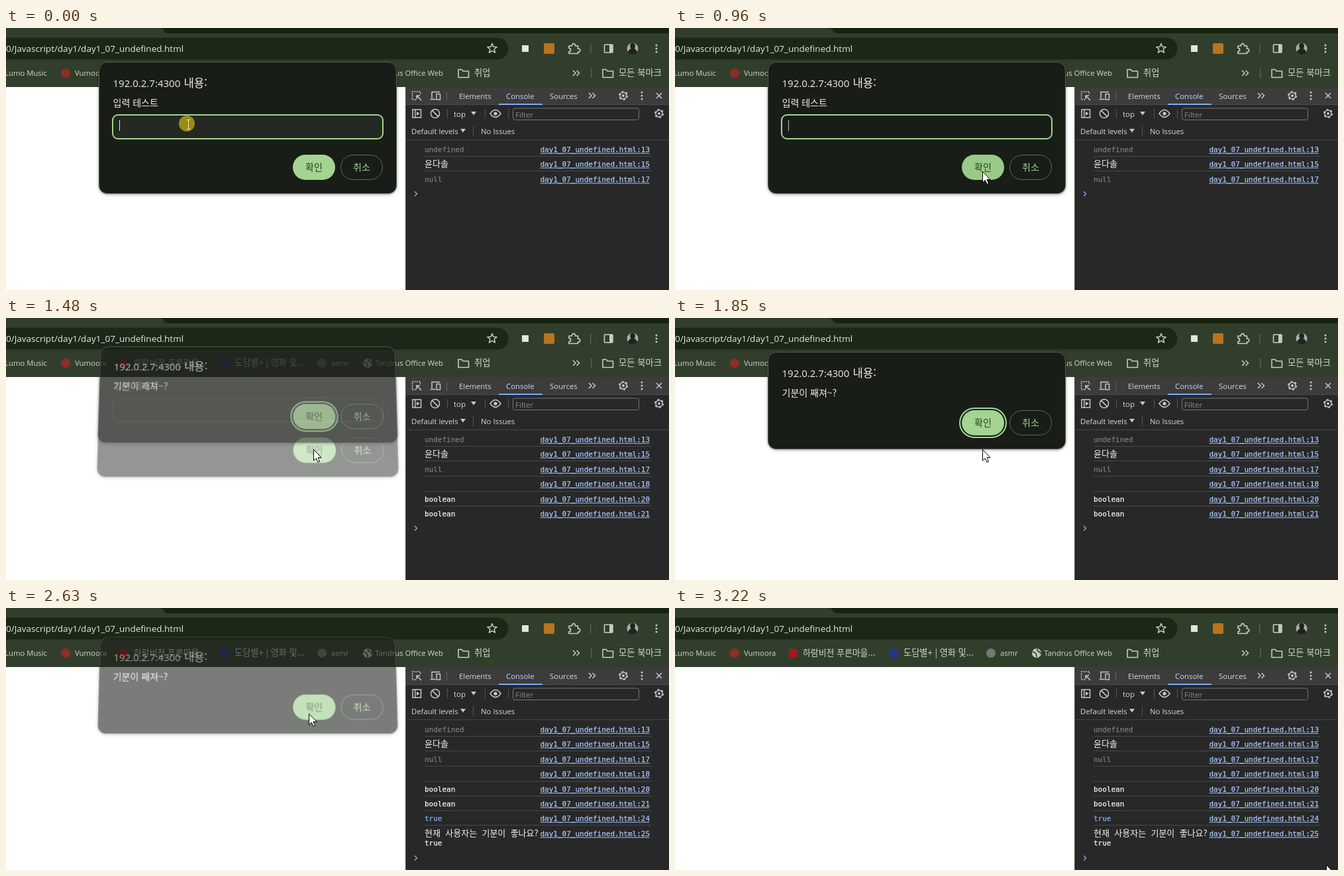
Recreate the animation shown at these times as an HTML page. Size 1001 px wide and 395 px high, loop 3.27 s.

```html
<!DOCTYPE html>
<html lang="ko">
<head>
<meta charset="utf-8">
<style>
html, body { margin: 0; width: 100%; height: 100%; overflow: hidden; background: #fff; }
svg { position: absolute; left: 0; top: 0; overflow: hidden; }
text { white-space: pre; }
.ui { font-family: "Open Sans", "Noto Sans", sans-serif; }
.ko { font-family: "Noto Sans CJK KR", "Noto Sans KR", "Noto Sans CJK", "Noto Sans CJK JP", sans-serif; }
.mono { font-family: "DejaVu Sans Mono", "Noto Sans Mono", monospace; }
.frame { filter: drop-shadow(0 1px 2px rgba(0, 0, 0, .4)); }
</style>
</head>
<body>
<script>
const LOOP = 3270;
const W = 1001, H = 395;
const ICON = '#c6cdc0', LABEL = '#d2d9cb', TOOL = '#c7cac8', TAB = '#d6d9d7';
const GREEN = '#a3d491', HOVER = '#99cb88', PANEL = '#191d17', TITLE = '#ecefe9';

const layer = (id, inner) => `<svg id="${id}" width="${W}" height="${H}" viewBox="0 0 ${W} ${H}">${inner}</svg>`;
const rect = (x, y, w, h, fill, more = '') => `<rect x="${x}" y="${y}" width="${w}" height="${h}" fill="${fill}" ${more}/>`;
const dot = (x, y, r, fill, more = '') => `<circle cx="${x}" cy="${y}" r="${r}" fill="${fill}" ${more}/>`;
const line = (d, color, width = 1.5, more = '') => `<path d="${d}" fill="none" stroke="${color}" stroke-width="${width}" ${more}/>`;
const shape = (d, fill) => `<path d="${d}" fill="${fill}"/>`;
const text = (s, x, y, size, fill, font = 'ui', more = '') =>
  `<text class="${font}" x="${x}" y="${y}" font-size="${size}" fill="${fill}" ${more}>${s}</text>`;

const dots = (x, y, color) => [-5, 0, 5].map(d => dot(x, y + d, 1.5, color)).join('');
const folder = x => line(`M${x} 62.5h5l2 2.5h8.5v9.5h-15.5z`, ICON, 1.6, 'stroke-linejoin="round"');
const chevrons = (x, y, color) => line(`M${x} ${y - 4}l4 4l-4 4M${x + 5.5} ${y - 4}l4 4l-4 4`, color);
const triangle = (x, y) => shape(`M${x} ${y}h8l-4 5.5z`, TOOL);
const gear = (x, y) => dot(x, y, 5, 'none', `stroke="${TOOL}" stroke-width="1.4"`) +
  dot(x, y, 6.3, 'none', `stroke="${TOOL}" stroke-width="1.6" stroke-dasharray="3 3.6"`) + dot(x, y, 1.9, TOOL);

function star(x, y) {
  const points = Array.from({ length: 10 }, (_, i) => {
    const r = i % 2 ? 3.3 : 7.6, a = i * Math.PI / 5;
    return `${(x + r * Math.sin(a)).toFixed(1)},${(y - r * Math.cos(a)).toFixed(1)}`;
  });
  return `<polygon points="${points.join(' ')}" fill="none" stroke="${ICON}" stroke-width="1.5" stroke-linejoin="round"/>`;
}

function browser() {
  return rect(0, 0, W, 89, '#17220f') +
    shape(`M0 0H230Q237 0 238 3.5Q239 8 246 8H${W}V89H0z`, '#323e2c') +
    shape('M0 14.5H742a16.5 16.5 0 0 1 0 33H0z', '#1c2817') +
    text('0/Javascript/day1/day1_07_undefined.html', 0, 36, 13.5, '#e3e9de') +
    star(734, 31) +
    rect(779, 26, 10, 10, '#dcebd6') +
    rect(812, 23, 16, 16, '#b8741f', 'rx="2"') +
    line('M850 27h4.5a2.6 2.6 0 1 1 5 0h4v4.2a2.6 2.6 0 1 1 0 5v2.3h-13.5v-3a2.6 2.6 0 0 0 0-5.2z', ICON, 1.7, 'stroke-linejoin="round"') +
    rect(882, 24, 1.5, 14, '#56634e') +
    rect(903.5, 25, 12.5, 12, 'none', `stroke="${ICON}" stroke-width="1.6" rx="1"`) + rect(911, 25, 5, 12, ICON) +
    dot(946, 31, 8.5, '#a9ada3') +
    shape('M939 37Q940 32 943.5 31.5Q940 23 946 22.5Q952 23 949 31.5Q952 32 953 37Q946 43 939 37z', '#20231f') +
    dots(982, 31, ICON) +
    text('Lumo Music', 62, 72, 11.3, LABEL, 'ui', 'text-anchor="end"') +
    dot(90, 68, 7, '#8d2f23') + text('Vumoora', 104, 72, 11.3, LABEL) +
    rect(172, 62, 12, 12, '#ad171b') + text('하람비전 푸른마을...', 193, 72.3, 12.9, LABEL, 'ko') +
    dot(330, 68, 7, '#24358f') + text('도담별+ | 영화 및...', 345, 72.3, 13.2, LABEL, 'ko') +
    dot(477, 68, 7, '#72787a') + text('asmr', 491, 72, 11.2, LABEL) +
    dot(546, 68, 7, ICON) + line('M540 66q4 1 5 3t1 5M547 61.5q-1 3 2 4t3 4', '#4a5545', 2) +
    text('Tandrus Office Web', 660, 72, 11.3, LABEL, 'ui', 'text-anchor="end"') +
    folder(683) + text('취업', 707, 72.3, 13.2, LABEL, 'ko') +
    chevrons(856, 68, ICON) + rect(883, 61, 1.5, 14, '#56634e') +
    folder(901) + text('모든 북마크', 925, 72.3, 13.3, LABEL, 'ko');
}

// Console messages: value, colour, source line, baseline, divider above, appearance stage, font
const GREY = '#7d7d7d', LIGHT = '#f1f3f4', LINK = '#a8c7fa';
const rows = [
  ['undefined', GREY, 13, 187, 0, 0], ['윤다솔', LIGHT, 15, 209, 193, 0, 'ko'], ['null', GREY, 17, 232, 215, 0],
  ['', LIGHT, 18, 254, 238, 1], ['boolean', LIGHT, 20, 277, 261, 1], ['boolean', LIGHT, 21, 299, 283, 1],
  ['true', '#7cacf8', 24, 321, 305, 2], ['현재 사용자는 기분이 좋나요?', LIGHT, 25, 344, 327, 2, 'ko'],
];
const promptY = [250, 317, 377];

// A hairline outline gives the small monospace text its heavier look
const code = (s, x, y, color) => text(s, x, y, 11, color, 'mono', `stroke="${color}" stroke-width=".25"`);

function message([value, color, number, y, divider, , font]) {
  return (divider ? rect(632, divider, 343, 1, '#474747') : '') +
    (font ? text(value, 632, y, 13, color, font, 'word-spacing="3.7"') : code(value, 632, y, color)) +
    (number === 25 ? code('true', 632, y + 14, color) : '') +
    code(`day1_07_undefined.html:${number}`, 806.5, y, LINK) +
    rect(806.5, y + 1.5, 165, 1, LINK);
}

function devtools() {
  const groups = [0, 1, 2].map(n => `<g id="rows${n}">${rows.filter(r => r[5] === n).map(message).join('')}</g>`);
  return rect(603, 89, 398, 306, '#282828') + rect(603, 89, 398, 26, '#3c3c3c') +
    rect(603, 89, 1, 306, '#4c4f4c') + rect(604, 115, 397, 1, '#4b4b4b') + rect(604, 168, 397, 1, '#474747') +
    line('M619 108h-5.5v-12h12v5', TOOL, 1.4, 'stroke-dasharray="2 1.4"') +
    line('M627 109l-6.5-6.5M620 107v-5h5', TOOL) +
    line('M643 106v-9.5h12M640.5 107.5h8', TOOL) + rect(650, 99.5, 5.5, 8.5, 'none', `stroke="${TOOL}" stroke-width="1.4"`) +
    rect(665, 96, 1, 14, '#606060') +
    text('Elements', 684, 107, 11.3, TAB) + text('Console', 755, 107, 11.4, '#c4d9fc') + text('Sources', 821, 107, 11.4, TAB) +
    rect(744, 114, 66, 2, '#7cacf8') +
    chevrons(880, 102, TOOL) + gear(932, 102) + dots(960, 102, TOOL) + line('M982 98l8 8m0-8l-8 8', TOOL) +
    rect(614, 123, 12.5, 12, 'none', `stroke="${TOOL}" stroke-width="1.5"`) + line('M617.8 123v12', TOOL, 1.4) +
    shape('M620 126l4.5 3l-4.5 3z', TOOL) +
    dot(648, 129, 6.6, 'none', `stroke="${TOOL}" stroke-width="1.5"`) + line('M643.4 124.4l9.2 9.2', TOOL) +
    rect(666, 122, 1, 14, '#555') + text('top', 676, 133.5, 11.5, TAB) + triangle(702, 126) +
    rect(723, 122, 1, 14, '#555') +
    line('M731 129q8-11 16 0q-8 11-16 0z', TOOL) + dot(739, 129, 2.6, TOOL) +
    rect(758, 122, 1, 14, '#555') +
    rect(765.5, 121, 190, 17.5, '#282828', 'rx="3" stroke="#747775"') + text('Filter', 769, 134.5, 11.6, '#868a88') +
    gear(986, 129) +
    text('Default levels', 612, 160, 11.3, TAB) + triangle(686, 152) +
    rect(705, 148, 1, 15, '#555') + text('No Issues', 717, 160, 11.4, TAB) +
    groups.join('') + line('M0-3.5l3.5 3.5l-3.5 3.5', '#7cacf8', 1.4, 'id="chevron"');
}

// Shared window: frame, title, body text and both buttons
const dialog = (height, body, buttonY, extra) =>
  rect(140.5, 51.5, 449, height, PANEL, 'rx="12" stroke="#596054" class="frame"') +
  text('192.0.2.7:4300', 161.5, 88.5, 15, TITLE) + text('내용:', 268.5, 88.5, 16.7, TITLE, 'ko') +
  text(body, 161.5, 117.5, 14, TITLE, 'ko') + extra +
  rect(433, buttonY, 64, 38, GREEN, 'rx="19" class="ok"') +
  text('확인', 452, buttonY + 24, 14, '#24421c', 'ko') +
  rect(505.5, buttonY + .5, 63, 37, 'transparent', 'rx="18.5" stroke="#5d6a56" class="cancel"') +
  text('취소', 524, buttonY + 24, 14, GREEN, 'ko');

document.body.innerHTML =
  layer('page', browser() + devtools()) +
  layer('prompt', dialog(198, '입력 테스트', 191,
    rect(161, 131, 408, 36, PANEL, 'rx="8" id="field"') + rect(171, 139, 1, 16, TITLE, 'id="caret"'))) +
  layer('confirm', dialog(146, '기분이 째져~?', 139,
    rect(430, 136, 70, 44, 'none', `rx="22" stroke="${GREEN}" stroke-width="2" id="ring"`))) +
  layer('pointer',
    dot(273, 144, 12, '#968d17', 'id="click"') +
    `<g id="beam">${line('M0-6.5h2.5h2.5M2.5-6.5v14M0 7.5h5', '#e6e4c8', 1)}</g>` +
    '<path id="arrow" d="M0 0V16.5L3.8 13L6.4 19L9 18L6.5 12H11.6z" fill="#fff" stroke="#000"/>');

const $ = id => document.getElementById(id);
const clamp = v => Math.max(0, Math.min(1, v));
const show = (id, on) => { $(id).style.opacity = +on; };
const ramp = (t, from, length) => clamp((t - from) / length);

// Pointer stops: time, x, y
const path = [
  [0, 273, 144], [30, 273, 144], [450, 464, 216], [1290, 464, 216], [1440, 464, 198], [1850, 464, 198],
  [2080, 520, 166], [2370, 457, 159], [2900, 457, 159], [3220, 983, 387], [LOOP, 983, 387],
];

function pointerAt(t) {
  const i = path.findIndex(p => p[0] > t);
  const [t0, x0, y0] = path[i - 1], [t1, x1, y1] = path[i];
  const k = (t - t0) / (t1 - t0), e = k * k * (3 - 2 * k);
  return [x0 + (x1 - x0) * e, y0 + (y1 - y0) * e];
}

// Window fades while rising and leaning back; away: 0 = in place, 1 = gone
function pose(id, away, centerY) {
  const style = $(id).style;
  style.opacity = 1 - away;
  style.visibility = away < 1 ? 'visible' : 'hidden';
  style.transformOrigin = `365px ${centerY}px`;
  style.transform = away > 0 && away < 1
    ? `translateY(${-20 * away}px) perspective(1000px) rotateX(${8 * Math.min(1, 2 * away)}deg)` : 'none';
}

function hover(id, buttonY, x, y) {
  const over = left => x >= left && x <= left + 64 && y >= buttonY && y <= buttonY + 38;
  document.querySelector(`#${id} .ok`).setAttribute('fill', over(433) ? HOVER : GREEN);
  document.querySelector(`#${id} .cancel`).setAttribute('fill', over(505) ? '#252c21' : 'transparent');
}

function draw() {
  const t = performance.now() % LOOP;
  const [x, y] = pointerAt(t);
  const swap = ramp(t, 1374, 202);

  pose('prompt', swap, 150.5);
  pose('confirm', t < 2000 ? 1 - swap : ramp(t, 2545, 205), 124.5);
  hover('prompt', 191, x, y);
  hover('confirm', 139, x, y);

  const focused = t < 1300, typing = y < 168 && t < 450;
  $('field').setAttribute('fill', typing ? '#252923' : PANEL);
  $('field').setAttribute('stroke', focused ? GREEN : '#5d6a56');
  $('field').setAttribute('stroke-width', focused ? 2 : 1);
  show('caret', t < 960 ? 1 : t < 990 ? .8 : 0);
  show('ring', t < 2415);

  const stage = t < 1360 ? 0 : t < 2530 ? 1 : 2;
  show('rows1', stage > 0);
  show('rows2', stage > 1);
  $('chevron').setAttribute('transform', `translate(617 ${promptY[stage]})`);

  show('beam', typing);
  show('arrow', !typing);
  show('click', 1 - ramp(t, 30, 90));
  $('click').setAttribute('transform', `translate(${x - 273} ${y - 144})`);
  $('beam').setAttribute('transform', `translate(${x} ${y + 1})`);
  $('arrow').setAttribute('transform', `translate(${x + .5} ${y + .5})`);
  requestAnimationFrame(draw);
}
draw();
</script>
</body>
</html>
```
